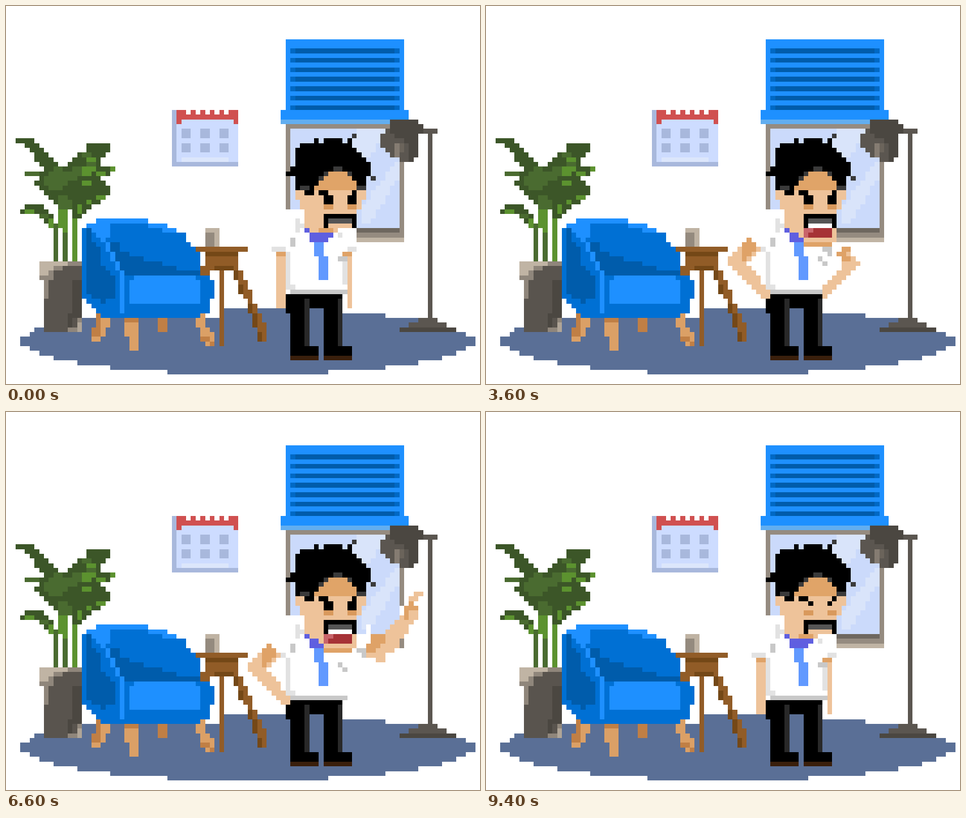
Recreate the animation shown at these times as an HTML page. Size 837 px wide and 669 px high, loop 9.7 s.

```html
<!DOCTYPE html>
<html lang="en">
<head>
<meta charset="utf-8">
<title>Office scene</title>
<style>
html, body { margin: 0; width: 100%; height: 100%; overflow: hidden; background: #fff; }
svg { display: block; width: 100vw; height: 100vh; shape-rendering: crispEdges; }

/* Every pose change is a hard cut on one shared loop. */
.pose { animation: 9.7s step-end infinite; visibility: hidden; }
#left-down { animation-name: left-down; }
#left-hip { animation-name: left-hip; }
#calm { animation-name: calm; }
#talk { animation-name: talk; }
#right-hip { animation-name: right-hip; }
#point { animation-name: point; }
#anger { animation-name: anger; }
#eyes { animation-name: eyes; }
#blink { animation-name: blink; }

@keyframes left-down {
  0%, 92.783%, 100% { visibility: visible; }
  4.123% { visibility: hidden; }
}
@keyframes left-hip {
  0%, 92.783%, 100% { visibility: hidden; }
  4.123% { visibility: visible; }
}
@keyframes calm {
  0%, 19.587%, 88.659%, 100% { visibility: visible; }
  11.855%, 37.113% { visibility: hidden; }
}
@keyframes talk {
  0%, 19.587%, 88.659%, 100% { visibility: hidden; }
  11.855%, 37.113% { visibility: visible; }
}
@keyframes right-hip {
  0%, 19.587%, 52.577%, 88.659%, 100% { visibility: hidden; }
  11.855%, 37.113%, 75.773% { visibility: visible; }
}
@keyframes point {
  0%, 75.773%, 100% { visibility: hidden; }
  52.577% { visibility: visible; }
}
@keyframes anger {
  0%, 52.577%, 68.041%, 83.505%, 100% { visibility: hidden; }
  44.845%, 60.309%, 75.773% { visibility: visible; }
}
@keyframes eyes {
  0%, 24.742% { visibility: visible; }
  21.649%, 96.907%, 100% { visibility: hidden; }
}
@keyframes blink {
  0%, 24.742% { visibility: hidden; }
  21.649%, 96.907%, 100% { visibility: visible; }
}
</style>
</head>
<body>
<svg viewBox="0 0 100 80" preserveAspectRatio="none">
  <polygon id="rug" fill="#5a6f96" points="45,64 71,64 71,64.5 80,65.5 87,66.5 92,67.5 95,68.5 97,69.5 99,70.5 99,71.5
    97,72.5 95,73.5 92,74.5 87,75.5 80,76.5 68,77.5 68,78 34,78 34,77.5 22,76.5 15,75.5 10,74.5
    7,73.5 5,72.5 3,71.5 3,70.5 5,69.5 6,68.5 8,67.5 13,66.5 13,66 45,66"/>

  <g id="calendar">
    <rect x="35" y="22" width="14" height="12" fill="#a8b8dc"/>
    <rect x="36" y="22" width="13" height="11" fill="#cddcff"/>
    <rect x="37" y="32" width="10" height="1" fill="#dce6fb"/>
    <rect x="36" y="22" width="13" height="2" fill="#d05050"/>
    <path fill="#d05050" d="M36 24 h1 v1 h-1z M48 24 h1 v1 h-1z"/>
    <path stroke="#fff" stroke-dasharray="1 1" d="M38 22.5 H47"/>
    <path stroke="#a8b8dc" stroke-width="2" stroke-dasharray="2 2" d="M37 27 H47 M37 30 H47"/>
  </g>

  <g id="window">
    <rect x="59" y="25" width="25" height="24" fill="#958b80"/>
    <rect x="60" y="26" width="23" height="21" fill="#cbdafb"/>
    <polygon fill="#d9e4fa" points="75,26 81,26 76,33 72,33 72,29"/>
    <polygon fill="#d9e4fa" points="82,33 83,33 83,36 77,46 75,46 75,43"/>
    <rect x="74" y="47" width="9" height="1" fill="#6e675f"/>
    <rect x="74" y="49" width="10" height="1" fill="#c0b4a4"/>
    <rect x="59" y="43" width="15" height="7" fill="#fff"/>
    <polygon fill="#1e90ff" points="59,7 84,7 84,22 85,22 85,24 58,24 58,22 59,22"/>
    <rect x="58" y="24" width="26" height="1" fill="#62aef0"/>
    <path stroke="#0068c4" stroke-width="23" stroke-dasharray="1 1" d="M71.5 9 V22"/>
    <path stroke="#005cab" stroke-width="21" stroke-dasharray="1 1" d="M71.5 9 V22"/>
  </g>

  <g id="lamp">
    <polygon fill="#5b5650" points="82,24 87,24 87,25 88,25 88,26 91,26 91,27 90,27 90,66 96,69 82,69 88,66 89,66
      89,27 87,27 87,32 86,32 86,33 83,33 83,32 82,32 79,29 79,28 80,26 82,25"/>
    <polygon fill="#4b4741" points="82,24 87,24 88,25 88,27 87,27 87,32 86,33 85,33 85,29 81,27 81,25"/>
    <rect x="83" y="68" width="12" height="1" fill="#4b4741"/>
    <rect x="82" y="29" width="1" height="3" fill="#857c72"/>
    <rect x="83" y="29" width="1" height="2" fill="#6b645b"/>
  </g>

  <g id="plant">
    <path fill="#4a6b30" d="M10 46 h1 v8 h-1z M12 41 h1 v13 h-1z"/>
    <path fill="#5c922f" d="M14 44 h1 v10 h-1z M11 42 h1 v5 h-1z M12 43 h1 v5 h-1z"/>
    <polygon fill="#3c5628" points="2,28 6,28 12,34 13,34 16,31 17,31 17,30 17,29 22,29 22,31 20,33 20,34 23,34 23,35
      22,35 22,36 20,36 20,37 22,38 22,40 20,40 20,42 18,42 18,43 16,45 14,45 14,43 12,43 6,37
      7,37 7,36 4,36 4,35 9,35 6,32 6,31 4,29 2,29"/>
    <polygon fill="#3c5628" points="4,42 8,42 10,44 10,47 9,47 9,46 6,44 3,44 3,43 4,43"/>
    <polygon fill="#4a6b30" points="9,36 11,34 13,35 19,33 19,34 16,36 11,39 9,39 8,37"/>
    <polygon fill="#4a6b30" points="11,40 13,40 14,41 14,43 12,43 11,42"/>
    <path fill="#4a6b30" d="M4 35 h3 v1 h-3z M7 44 h2 v1 h-2z M16 31 h2 v1 h-2z"/>
    <path fill="#5c922f" d="M17 32 h2 v1 h-2z M16 34 h3 v1 h-3z M16 35 h2 v1 h-2z M22 34 h1 v1 h-1z
      M19 35 h2 v1 h-2z M16 37 h2 v1 h-2z M19 40 h2 v1 h-2z M17 41 h1 v1 h-1z
      M15 42 h1 v2 h-1z M9 45 h1 v2 h-1z M4 43 h2 v1 h-2z"/>
    <polygon fill="#8f867b" points="7,54 16,54 16,69 8,69 8,58 7,58"/>
    <polygon fill="#c0b4a4" points="7,54 13,54 13,55 11,55 8,57 7,57"/>
    <polygon fill="#59544e" points="12,55 16,55 16,66 15,66 15,68 13,68 13,69 8,69 8,62 9,62 9,58 10,58 10,56 12,56"/>
    <path fill="#4b4741" d="M14 58 h2 v8 h-2z M13 65 h1 v3 h-1z"/>
    <rect x="15" y="67" width="1" height="2" fill="#b0a597"/>
  </g>

  <g id="chair">
    <polygon fill="#dba066" points="19,65 22,65 22,68 21,68 21,70 20,70 20,71 18,71 18,68 19,68"/>
    <polygon fill="#dba066" points="25,66 28,66 28,73 26,73 26,70 25,70"/>
    <polygon fill="#dba066" points="40,65 42,65 42,67 44,69 44,72 43,72 41,70 41,68 40,68"/>
    <path fill="#c07f45" d="M19 65 h1 v3 h-1z M18 68 h2 v2 h-2z M25 66 h3 v1 h-3z M32 66 h2 v3 h-2z
      M41 70 h2 v1 h-2z M43 71 h1 v1 h-1z"/>
    <polygon fill="#0070d4" points="19,45 30,45 30,46 34,46 34,47 36,47 36,48 38,48 38,50 39,50 41,52 41,57 43,57 43,58
      44,58 44,62 43,62 43,65 41,65 41,66 20,66 20,65 17,62 16,62 16,47 17,47 17,46 19,46"/>
    <polygon fill="#1e90ff" points="19,45 30,45 30,46 34,46 34,47 36,47 36,48 33,48 33,47 30,47 30,46 22,46 22,49 21,49
      21,50 22,50 25,56 25,65 24,65 24,57 20,49 19,49 19,48 17,48 17,46 19,46"/>
    <polygon fill="#005cab" points="17,47 18,47 18,49 20,51 20,54 23,57 23,62 21,62 21,63 20,63 20,62 18,62 18,61 17,61"/>
    <polygon fill="#005cab" points="22,50 24,50 24,52 38,56 41,56 41,57 25,57 22,51"/>
    <polygon fill="#1e90ff" points="27,57 40,57 40,58 41,58 41,63 26,63 26,58 27,58"/>
  </g>

  <g id="table">
    <rect x="40" y="51" width="11" height="1" fill="#915c27"/>
    <polygon fill="#915c27" points="42,52 49,52 49,56 46,56 46,72 45,72 45,56 43,56 43,57 41,57 41,55 42,55"/>
    <polygon fill="#915c27" points="48,56 49.5,56 55,68 55,71 53,71 53,68"/>
    <path fill="#744817" d="M42 52 h7 v1 h-7z M44 55 h4 v1 h-4z M48 56 h1 v2 h-1z M49 59 h1 v2 h-1z
      M51 63 h1 v2 h-1z M52 65 h1 v3 h-1z M53 69 h1 v2 h-1z"/>
    <rect x="42" y="47" width="3" height="4" fill="#bfb3a3"/>
    <rect x="42" y="48" width="2" height="3" fill="#948a7e"/>
  </g>

  <g id="man">
    <polygon points="59,61 71,61 71,72 73,72 73,75 67,75 67,64 64,64 64,72 66,72 66,75 60,75 60,65 59,65"/>
    <path fill="#292929" d="M63 62 h1 v10 h-1z M70 62 h1 v10 h-1z"/>
    <path fill="#3a1f0c" d="M60 74 h6 v1 h-6z M67 74 h6 v1 h-6z"/>

    <polygon fill="#fff" points="61,45 63,45 63,47 72,47 72,49 73,49 73,51 72,51 72,60 71,60 71,61 59,61 59,50 61,50"/>
    <path fill="#e2e2e2" d="M61 45 h1 v3 h-1z M62 46 h1 v1 h-1z M59 52 h1 v8 h-1z M60 59 h1 v1 h-1z"/>
    <path fill="#c8c8c8" d="M60 49 h1 v2 h-1z M60 60 h12 v1 h-12z"/>

    <polygon fill="#eec39a" points="61,39 76,39 76,41 75,41 75,43 74,43 74,47 70,47 70,48 64,48 64,47 63,47 63,43 62,43 62,41 61,41"/>
    <polygon points="62,29 65,29 65,28 66,28 66,29 67,29 67,28 71,28 71,29 72,29 72,28 73,28 73,30 74,30 77,33 77,36
      76,36 76,39 65,39 65,40 63,40 63,39 61,39 61,36 59,36 59,35 60,35 60,34 61,34 61,30 62,30"/>
    <path fill="#3a3a3a" d="M73 27 h1 v1 h-1z M77 36 h1 v1 h-1z M69 34 h2 v1 h-2z M67 35 h1 v1 h-1z
      M66 36 h1 v1 h-1z M72 35 h1 v1 h-1z M62 38 h2 v1 h-2z M74 38 h2 v1 h-2z"/>
    <polygon fill="#e0a468" points="69,35 72,35 74,37 74,39 65,39"/>
    <path d="M66 39 h2 v1 h-2z M73 39 h1 v1 h-1z"/>
    <path id="eyes" class="pose" d="M67 40 h2 v2 h-2z M72 40 h2 v2 h-2z"/>
    <path id="blink" class="pose" d="M68 40 h1 v1 h-1z M72 40 h1 v1 h-1z"/>
    <path fill="#d9995c" d="M67 42 h2 v1 h-2z M72 42 h2 v1 h-2z"/>

    <polygon fill="#5f5fe0" points="63,47 64,47 64,48 66,48 66,49 67,49 67,50 64,50 64,48 63,48"/>
    <polygon fill="#6199ff" points="65,50 67,50 67,53 68,53 68,58 66,58 66,53 65,53"/>
    <polygon points="67,44 74,44 74,47 73,47 73,46 68,46 68,47 67,47"/>
    <rect x="68" y="45" width="5" height="1" fill="#555"/>

    <g id="left-down" class="pose">
      <rect x="57" y="52" width="2" height="12" fill="#eec39a"/>
      <rect x="57" y="52" width="2" height="1" fill="#dfa267"/>
      <rect x="56" y="51" width="3" height="1" fill="#e2e2e2"/>
    </g>
    <g id="left-hip" class="pose">
      <polygon fill="#eec39a" points="56,49 58,51 58,52 55,55 56,55 58,57 58,59 59,59 59,60 60,60 60,62 59,62 51,54 51,53 52,53"/>
      <polygon fill="#dfa267" points="56,49 57,50 57,52 55,54 54,54 54,51"/>
      <rect x="58" y="51" width="1" height="1" fill="#e2e2e2"/>
    </g>

    <g id="calm" class="pose">
      <path fill="#dfa267" d="M66 47 h3 v1 h-3z M71 52 h2 v1 h-2z"/>
      <path fill="#5f5fe0" d="M64 48 h5 v1 h-5z M64 49 h4 v1 h-4z"/>
      <path fill="#eec39a" d="M72 53 h1 v11 h-1z M68 46 h5 v1 h-5z"/>
      <path fill="#e2e2e2" d="M72 51 h2 v1 h-2z M70 48 h1 v1 h-1z M71 54 h1 v5 h-1z"/>
      <rect x="70" y="53" width="2" height="1" fill="#c8c8c8"/>
    </g>

    <g id="talk" class="pose">
      <path fill="#eec39a" d="M66 47 h8 v2 h-8z M67 49 h7 v1 h-7z"/>
      <rect x="67" y="50" width="6" height="1" fill="#dfa267"/>
      <rect x="68" y="46" width="5" height="1" fill="#fff"/>
      <rect x="67" y="47" width="6" height="2" fill="#c8646a"/>
      <path fill="#a63236" d="M69 47 h4 v1 h-4z M68 48 h5 v1 h-5z"/>
      <path fill="#c8c8c8" d="M70 53 h1 v1 h-1z M71 54 h1 v1 h-1z"/>
    </g>

    <g id="right-hip" class="pose">
      <polygon fill="#eec39a" points="75,51 77,51 77,53 78,53 79,54 79,55 72,62 71,62 71,60 75,56 75,54 76,54 76,53 74,53 74,52 75,52"/>
      <path fill="#dfa267" d="M75 51 h2 v1 h-2z M74 52 h2 v1 h-2z M75 53 h2 v1 h-2z"/>
      <path fill="#c8c8c8" d="M71 51 h2 v1 h-2z M72 52 h1 v1 h-1z"/>
    </g>

    <g id="point" class="pose">
      <polygon fill="#fff" points="74,47 76,47 76,45 77,45 77,47 83,47 83,41 84,41 84,50 74,50"/>
      <rect x="83" y="48" width="1" height="2" fill="#958b80"/>
      <polygon fill="#eec39a" points="86,38 88,38 88,39 86,41 87,41 87,44 86,44 82,51 80,51 80,53 78,53 78,52 76,52 76,49
        77,49 77,47 80,47 84,43 84,41 85,41 85,39 86,39"/>
      <polygon fill="#dfa267" points="85,40 86,40 86,41 87,41 87,42 85,42 85,44 84,44 84,41 85,41"/>
      <polygon fill="#dfa267" points="77,47 80,47 80,48 78,51 76,51 76,49 77,49"/>
      <path fill="#c8c8c8" d="M74 50 h2 v1 h-2z M75 51 h1 v1 h-1z"/>
    </g>

    <g id="anger" class="pose">
      <path fill="#d8161c" d="M61 27 h1 v3 h-1z M59 29 h2 v1 h-2z M63 27 h1 v3 h-1z M64 29 h2 v1 h-2z
        M61 31 h1 v3 h-1z M59 31 h2 v1 h-2z M63 31 h1 v3 h-1z M64 31 h2 v1 h-2z"/>
      <path fill="#e0696d" d="M61 28 h1 v2 h-1z M60 29 h1 v1 h-1z M63 29 h1 v1 h-1z M61 31 h1 v2 h-1z M63 31 h2 v1 h-2z"/>
    </g>
  </g>
</svg>
<script>
// Turns each polygon into whole grid cells, so slanted edges become stairs.
function snap(polygon) {
  const pts = [...polygon.points];
  const ys = pts.map(p => p.y);
  let d = "";
  for (let row = Math.floor(Math.min(...ys)); row < Math.max(...ys); row++) {
    const mid = row + 0.5;
    const hits = [];
    pts.forEach((a, i) => {
      const b = pts[(i + 1) % pts.length];
      if ((a.y <= mid) !== (b.y <= mid)) {
        const x = a.x + (b.x - a.x) * (mid - a.y) / (b.y - a.y);
        hits.push(Math.ceil(x - 0.501));
      }
    });
    hits.sort((a, b) => a - b);
    for (let i = 0; i + 1 < hits.length; i += 2) {
      d += `M${hits[i]} ${row}H${hits[i + 1]}v1H${hits[i]}z`;
    }
  }
  const path = document.createElementNS("http://www.w3.org/2000/svg", "path");
  path.setAttribute("d", d);
  path.setAttribute("fill", polygon.getAttribute("fill") || "#000");
  polygon.replaceWith(path);
}
document.querySelectorAll("polygon").forEach(snap);
</script>
</body>
</html>
```
